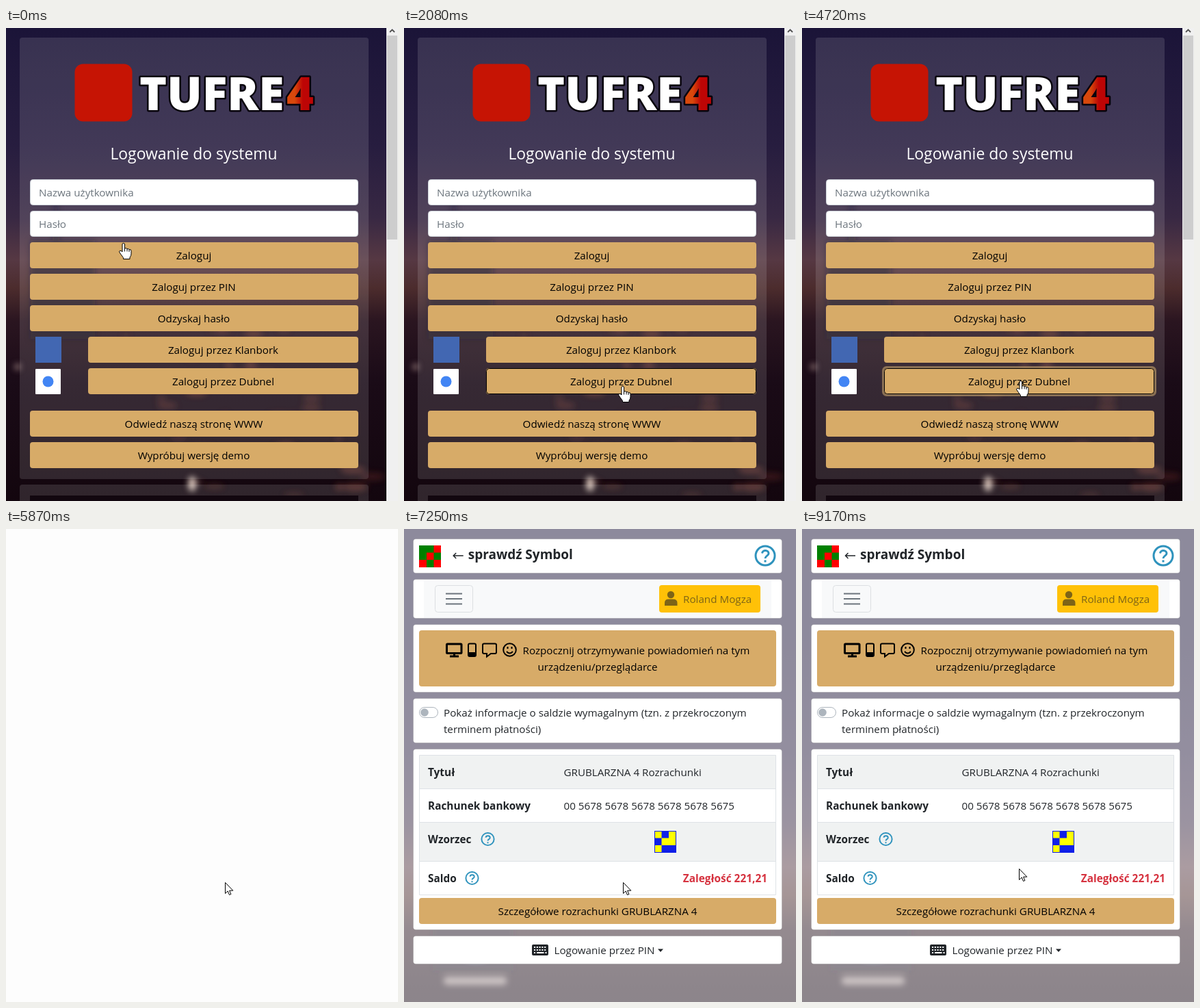
Animation, 573 px wide and 691 px high, one loop 9250 ms. Source, as an HTML page:

```html
<!DOCTYPE html>
<html lang="pl">
<head>
<meta charset="utf-8">
<title>Logowanie</title>
<style>
html, body { margin: 0; width: 100%; height: 100%; overflow: hidden; background: #fdfdfd; }
svg { display: block; width: 573px; height: 691px; }
text { font: 15.2px "Open Sans", "Noto Sans", sans-serif; fill: #212529; }
.mid { text-anchor: middle; }
.dark { fill: #000; }
.bold { font-size: 15.4px; font-weight: 700; }
.hint { fill: #6c757d; }
.card { fill: #fff; stroke: #000; stroke-opacity: .12; }
.gold { fill: #d7ab68; }
.line { fill: none; stroke: currentColor; stroke-width: 2; }
.brand { font-size: 68px; font-weight: 800; fill: #fff; stroke: #08040c; stroke-width: 5; stroke-linejoin: round; paint-order: stroke; }
#login { animation: leave 9.25s step-end infinite; }
#home { animation: enter 9.25s step-end infinite; }
#cards { animation: fade 9.25s linear infinite; }
#title { animation: nudge 9.25s ease-in-out infinite; }
#ring { animation: ring 9.25s linear infinite; }
@keyframes leave { 0% { visibility: visible } 63.459%, to { visibility: hidden } }
@keyframes enter { 0% { visibility: hidden } 65.081%, to { visibility: visible } }
@keyframes fade { 0%, 65.4% { opacity: 0 } 74.27%, to { opacity: 1 } }
@keyframes ring { 0%, 48.54% { opacity: 0 } 51.03%, to { opacity: 1 } }
@keyframes nudge {
  0%, 64.43%, 74.16%, 83.89%, 93.62%, to { transform: none }
  69.3%, 79.03%, 88.76% { transform: translateX(9px) }
}
</style>
</head>
<body>
<svg viewBox="0 0 573 691" xmlns="http://www.w3.org/2000/svg">
<defs>
  <linearGradient id="sky" gradientUnits="userSpaceOnUse" x1="0" y1="0" x2="0" y2="691">
    <stop offset="0" stop-color="#1b1438"/>
    <stop offset=".25" stop-color="#271d3f"/>
    <stop offset=".4" stop-color="#382843"/>
    <stop offset=".49" stop-color="#563843"/>
    <stop offset=".55" stop-color="#4c2c2d"/>
    <stop offset=".62" stop-color="#2a1520"/>
    <stop offset=".75" stop-color="#1a0b17"/>
    <stop offset="1" stop-color="#13060e"/>
  </linearGradient>
  <linearGradient id="digit">
    <stop offset=".3" stop-color="#d8480c"/>
    <stop offset=".6" stop-color="#bd0505"/>
  </linearGradient>
  <filter id="soft" x="-50%" y="-50%" width="200%" height="200%"><feGaussianBlur stdDeviation="4"/></filter>
  <rect id="dusk" x="-20" y="-160" width="620" height="860" fill="url(#sky)"/>
  <path id="tower" d="M72 310L76 225H80L86 310H150V490H32V310Z" fill="#1b1020"/>
  <g id="help" fill="none" stroke="#2f93bd">
    <circle r="14" stroke-width="3"/>
    <path d="M-4.5-3.5C-4-9 5-8.500 5-3.200C5 .3 0 0 0 4M0 6.500V9.500" stroke-width="3"/>
  </g>
</defs>

<g id="login">
  <use href="#dusk"/>
  <g filter="url(#soft)">
    <use href="#tower" transform="translate(10 62) scale(.8)" opacity=".5"/>
    <g id="lights"></g>
    <circle cx="17" cy="495" r="5" fill="#a58a88" opacity=".7"/>
    <ellipse cx="272" cy="666" rx="6" ry="11" fill="#e8d4c8" opacity=".9"/>
  </g>
  <rect x="20" y="14" width="510" height="645" rx="4" fill="#fff" opacity=".125"/>
  <rect x="20" y="667" width="510" height="40" rx="4" fill="#fff" opacity=".125"/>
  <rect x="35" y="683" width="480" height="8" fill="#12070f"/>
  <rect x="100.500" y="52.500" width="84" height="84" rx="12" fill="#c61404"/>
  <text class="brand" x="195" y="120">TUFRE</text>
  <text class="brand" x="410" y="120" style="fill:url(#digit)">4</text>
  <text class="mid" x="274.500" y="192" style="font-size:22.900px;fill:#fff">Logowanie do systemu</text>
  <g fill="#fff" stroke="#ced4da">
    <rect x="35.500" y="221.500" width="479" height="37" rx="4"/>
    <rect x="35.500" y="267.500" width="479" height="37" rx="4"/>
  </g>
  <text class="hint" x="48" y="246">Nazwa użytkownika</text>
  <text class="hint" x="48" y="292">Hasło</text>
  <rect x="43" y="451" width="38" height="38" fill="#4267b2"/>
  <rect x="43" y="498" width="37" height="37" rx="1" fill="#fff"/>
  <circle cx="61.500" cy="516.500" r="8" fill="#4285f4"/>
  <rect id="ring" x="118.500" y="495.500" width="398" height="41" rx="5" fill="none" stroke="#deb876" stroke-opacity=".5" stroke-width="3"/>
  <g id="buttons"></g>
  <rect x="556" width="17" height="691" fill="#f0f0f0"/>
  <rect x="557" y="11" width="15" height="298" fill="#cdcdcd"/>
  <path d="M561 6L564.500 2.500 568 6" fill="none" stroke="#505050" stroke-width="1.800"/>
</g>

<g id="home">
  <g transform="translate(10 155)">
    <use href="#dusk"/>
    <g filter="url(#soft)">
      <use href="#tower" opacity=".8"/>
      <ellipse cx="95" cy="466" rx="24" ry="10" fill="#6b7ba8" opacity=".6"/>
      <rect x="48" y="499" width="92" height="12" rx="5" fill="#d8c6c0" opacity=".65"/>
      <circle cx="152" cy="318" r="7" fill="#b59a9a" opacity=".6"/>
      <circle cx="38" cy="318" r="6" fill="#b59a9a" opacity=".5"/>
    </g>
  </g>
  <rect width="573" height="691" fill="#fff" opacity=".5"/>

  <rect class="card" x="13.500" y="14.500" width="539" height="50" rx="4"/>
  <rect x="22" y="24" width="32" height="32" fill="#f00"/>
  <path d="M22 24H43.500V34.500H33V45H22ZM43.500 34.500H54V45H43.500ZM33 45H43.500V56H33Z" fill="#008000"/>
  <g id="title">
    <path d="M78 39H63.500M67.500 35L63.500 39 67.500 43" fill="none" stroke="#212529" stroke-width="1.500"/>
    <text class="bold" x="85" y="44" style="font-size:19px">sprawdź Symbol</text>
  </g>
  <use href="#help" x="528" y="39"/>

  <rect class="card" x="13.500" y="73.500" width="539" height="57" rx="4"/>
  <rect x="29" y="74" width="508" height="56" fill="#f8f9fa"/>
  <rect x="45.500" y="82.500" width="55" height="39" rx="4" fill="none" stroke="#dcdfe2"/>
  <path d="M61 94.500H85M61 102H85M61 109.500H85" stroke="#6c757d" stroke-width="2"/>
  <rect x="373" y="82" width="148" height="40" rx="4" fill="#ffc107"/>
  <g fill="#7d6417">
    <circle cx="390" cy="96" r="5.200"/>
    <path d="M381 112V108Q381 102.500 386.500 102.500H393.500Q399.500 102.500 399.500 108V112Z"/>
  </g>
  <text x="408" y="108" style="fill:#7d6417">Roland Mogza</text>

  <g id="cards">
    <rect class="card" x="13.500" y="139.500" width="539" height="99" rx="4"/>
    <rect class="gold" x="22" y="148" width="522" height="82" rx="4"/>
    <g class="line" color="#000">
      <rect x="62.500" y="168" width="21.500" height="13.500" rx="1" stroke-width="3"/>
      <path d="M67 186H80M73.500 182V186" stroke-width="3"/>
      <rect x="94" y="167.500" width="11" height="18.500" rx="2"/>
      <path d="M94 182.500H105" stroke-width="5"/>
      <path d="M117 167.500H133Q135 167.500 135 169.500V180Q135 182 133 182H127L121 186.500V182H117Q115 182 115 180V169.500Q115 167.500 117 167.500Z"/>
      <circle cx="154.500" cy="176.500" r="9.300"/>
      <path d="M150 179Q154.500 184 159 179M151.500 172V175M157.500 172V175"/>
    </g>
    <text class="dark" x="173.500" y="183">Rozpocznij otrzymywanie powiadomień na tym</text>
    <text class="dark mid" x="283" y="207">urządzeniu/przeglądarce</text>

    <rect class="card" x="13.500" y="247.500" width="539" height="65" rx="4"/>
    <rect x="22.500" y="260.500" width="27" height="15" rx="7.500" fill="#fff" stroke="#adb5bd"/>
    <circle cx="30" cy="268" r="5.800" fill="#adb5bd"/>
    <text x="58" y="274">Pokaż informacje o saldzie wymagalnym (tzn. z przekroczonym</text>
    <text x="58" y="298">terminem płatności)</text>

    <rect class="card" x="13.500" y="321.500" width="539" height="264" rx="4"/>
    <path d="M22 330H544V379H22ZM22 428H544V485H22Z" fill="#f0f2f2"/>
    <path d="M22.500 330.500H543.500V534.500H22.500ZM22 379.500H544M22 428.500H544M22 485.500H544" fill="none" stroke="#dee2e6"/>
    <text class="bold" x="35" y="361">Tytuł</text>
    <text x="233.500" y="361">GRUBLARZNA 4 Rozrachunki</text>
    <text class="bold" x="35" y="410">Rachunek bankowy</text>
    <text x="233.500" y="410">00 5678 5678 5678 5678 5678 5675</text>
    <text class="bold" x="35" y="459">Wzorzec</text>
    <use href="#help" transform="translate(122.500 453) scale(.65)"/>
    <rect x="366.500" y="441.500" width="31" height="31" fill="#ff0" stroke="#1020e8"/>
    <path d="M376.500 441H387V451.500H376.500V462H366V451.500H376.500ZM376.500 462H398V473H376.500Z" fill="#1020e8"/>
    <text class="bold" x="35" y="516">Saldo</text>
    <use href="#help" transform="translate(99.500 510) scale(.65)"/>
    <text class="bold" x="531" y="516" text-anchor="end" style="fill:#d63340">Zaległość 221,21</text>
    <rect class="gold" x="22" y="539" width="522" height="38" rx="4"/>
    <text class="dark mid" x="283" y="564">Szczegółowe rozrachunki GRUBLARZNA 4</text>

    <rect class="card" x="13.500" y="594.500" width="539" height="41" rx="4"/>
    <rect x="187" y="607" width="24" height="16" rx="2" fill="#212529"/>
    <path d="M190 611H209M190 615H209" stroke="#fff" stroke-width="2" stroke-dasharray="2 1.800"/>
    <path d="M190 619H192M194 619H204.500M206.500 619H208.500" stroke="#fff" stroke-width="2"/>
    <text x="219.500" y="621">Logowanie przez PIN</text>
    <path d="M371 613.500H379L375 618Z" fill="#212529"/>
  </g>
</g>

<g id="cursor" stroke="#000" fill="#fff" stroke-linejoin="round">
  <path id="arrow" d="M.5.5V16.500L4.200 13 6.500 18.500 8.900 17.500 6.600 12.200H11.800Z"/>
  <g id="hand" transform="translate(0 -1)">
    <path d="M-2 13V2Q-2 .5-.3.5T1.500 2V8Q4.500 7 5 8.800Q7.800 8 8 9.800Q11 9 11 11.500V16Q11 19 9 21V23.500H-.5V21.500Q-4 17-6.500 13Q-6 10.500-3.800 11.500Z"/>
    <path d="M1.500 8V12.500M5 9V12.500M8 10V13" fill="none"/>
  </g>
</g>
</svg>

<script>
const LOOP = 9250, LEAVE = 5870;
const $ = id => document.getElementById(id);
const clamp = v => Math.max(0, Math.min(1, v));

// left edge, top edge, label
const buttons = [
  [35, 313, 'Zaloguj'],
  [35, 359, 'Zaloguj przez PIN'],
  [35, 405, 'Odzyskaj hasło'],
  [120, 451, 'Zaloguj przez Klanbork'],
  [120, 497, 'Zaloguj przez Dubnel'],
  [35, 559, 'Odwiedź naszą stronę WWW'],
  [35, 605, 'Wypróbuj wersję demo']
];

$('buttons').innerHTML = buttons.map(([x, y, label]) => `
  <rect class="gold" x="${x}" y="${y}" width="${515 - x}" height="38" rx="4"/>
  <rect class="edge" x="${x + .5}" y="${y + .5}" width="${514 - x}" height="37" rx="4" fill="none" stroke="#000" stroke-opacity="0"/>
  <text class="dark mid" x="${(x + 515) / 2 - (x < 100 ? .5 : 0)}" y="${y + 25}">${label}</text>`).join('');
const edges = [...document.querySelectorAll('.edge')];

// blurred city lights, denser to the lower right
let seed = 7;
const rnd = () => (seed = seed * 16807 % 2147483647) / 2147483647;
$('lights').innerHTML = Array.from({ length: 45 }, () => {
  const y = 440 + rnd() * 250, x = 130 + (y - 440) * .5 + rnd() * 300;
  return `<ellipse cx="${x}" cy="${y}" rx="${5 + rnd() * 14}" ry="${3 + rnd() * 4}" fill="#8a4032" opacity="${.15 + rnd() * .3}"/>`;
}).join('');

// time, x, y of the pointer tip
const path = [
  [0, 172, 315], [80, 172, 315], [1080, 321, 480],
  [1400, 332, 447], [1960, 326, 521], [2150, 318, 525],
  [2520, 292, 445], [2860, 276, 506], [3000, 281, 511],
  [3790, 320, 516], [7280, 320, 516], [7800, 258, 490],
  [8150, 240, 472], [8630, 269, 488], [8720, 269, 488], [9170, 317, 496]
];

function pointer(t) {
  const i = path.findIndex(p => p[0] > t);
  if (i < 0) return path[path.length - 1].slice(1);
  const [t0, x0, y0] = path[i - 1], [t1, x1, y1] = path[i];
  const u = (t - t0) / (t1 - t0), k = u * u * (3 - 2 * u);
  return [x0 + (x1 - x0) * k, y0 + (y1 - y0) * k];
}

const start = performance.now();

function draw() {
  const t = (performance.now() - start) % LOOP;
  const [x, y] = pointer(t).map(Math.round);
  const over = t < LEAVE
    ? buttons.findIndex(b => x >= b[0] && x < 515 && y >= b[1] && y < b[1] + 38)
    : -1;
  const edge = t < 80 ? 0 : 1 - clamp((t - 5040) / 140);
  edges.forEach((e, i) => e.setAttribute('stroke-opacity', i === over ? edge : 0));
  $('cursor').setAttribute('transform', `translate(${x} ${y})`);
  $('hand').style.display = over < 0 ? 'none' : '';
  $('arrow').style.display = over < 0 ? '' : 'none';
  requestAnimationFrame(draw);
}
draw();
</script>
</body>
</html>
```
